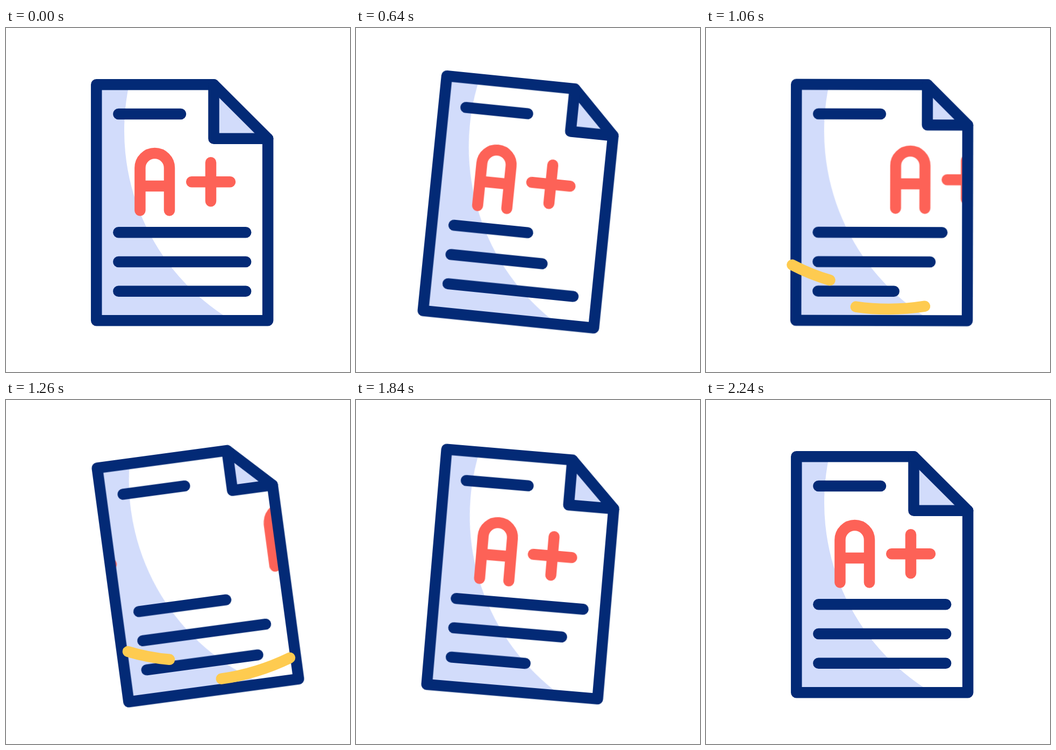
These frames come from a looping animation (640x640 px, 2.4 s). An HTML page:

```html
<!DOCTYPE html>
<html lang="en">
<head>
<meta charset="utf-8">
<title>Graded paper</title>
<style>
  html, body { margin: 0; width: 100%; height: 100%; overflow: hidden; background: #fff; }
  svg { display: block; width: 100%; height: 100%; }

  :root {
    --navy: #032a76;
    --pale: #d2dcfb;
    --red: #fd6257;
    --gold: #fecb50;
    --ease: cubic-bezier(.3333, 0, .6667, 1);
  }

  .stroke { fill: none; stroke: var(--navy); stroke-width: 20.5; stroke-linecap: round; stroke-linejoin: round; }
  .pale { fill: var(--pale); }
  .grade { stroke: var(--red); }
  .swoosh { stroke: var(--gold); }

  .page, .edge, .flap, .line, .leave, .enter { animation: 2400ms var(--ease) infinite both; }

  .page { transform-origin: 327.7px 105.2px; animation-name: swing; }
  .edge { animation-name: edge; }
  .flap { animation-name: flap; }
  .line { animation-name: write; animation-delay: calc(var(--i) * 200ms); }
  .leave { animation-name: leave; }
  .enter { animation-name: enter; }
  .swoosh { animation: sweep 2400ms linear infinite both; }

  @keyframes swing {
    0%, 8.333% { transform: rotate(0deg); }
    33.333% { transform: rotate(7deg); }
    58.333% { transform: rotate(-10deg); }
    75% { transform: rotate(5deg); }
    91.667%, 100% { transform: rotate(0deg); }
  }

  /* the folded corner shrinks, holds, then opens again */
  @keyframes edge {
    0%, 8.333%, 91.667%, 100% { d: path("M168.2 105.2 L386.5 105.2 L487.2 205.8 L487.2 544.2 L168.2 544.2 Z"); }
    33.333%, 66.667% { d: path("M168.2 105.2 L412 105.2 L487.2 180.3 L487.2 544.2 L168.2 544.2 Z"); }
  }
  @keyframes flap {
    0%, 8.333%, 91.667%, 100% { d: path("M386.5 105.2 L386.5 205.8 L487.2 205.8"); }
    33.333%, 66.667% { d: path("M412 105.2 L412 180.3 L487.2 180.3"); }
  }

  @keyframes write {
    0%, 8.333%, 41.667%, 75%, 100% { stroke-dasharray: 237 400; }
    25%, 58.333% { stroke-dasharray: 135 400; }
  }

  @keyframes leave {
    0%, 33.333% { transform: translate(0, 0); }
    58.333%, 100% { transform: translate(257.5px, -10.4px); }
  }
  @keyframes enter {
    0%, 50% { transform: translate(-254px, 0); }
    75%, 100% { transform: translate(0, 0); }
  }

  @keyframes sweep {
    0%, 33.333% { visibility: hidden; stroke-dasharray: 0 200; stroke-dashoffset: 0; }
    33.34% { visibility: visible; stroke-dasharray: 0 200; stroke-dashoffset: 0; }
    41.667% { visibility: visible; stroke-dasharray: 40 200; stroke-dashoffset: 0; }
    54.167% { visibility: visible; stroke-dasharray: 42.3 200; stroke-dashoffset: -57.7; }
    63.32% { visibility: visible; stroke-dasharray: 0 200; stroke-dashoffset: -100; }
    63.333%, 100% { visibility: hidden; stroke-dasharray: 0 200; stroke-dashoffset: -100; }
  }
</style>
</head>
<body>
<svg viewBox="0 0 640 640">
  <defs>
    <clipPath id="sheet"><path d="M168.2 105.2H487.2V544.2H168.2Z"/></clipPath>
    <path id="mark" d="M249.4 339.5V260.3a27.3 27.3 0 0 1 54.6 0V339.5M249.4 294H304M345.2 286.2H417M381 250.2V322.2"/>
  </defs>

  <g class="page">
    <path class="pale" d="M168.2 105.2H229A412 412 0 0 0 420 544.2H168.2Z"/>
    <g class="stroke grade" clip-path="url(#sheet)">
      <g class="leave"><use href="#mark"/></g>
      <g class="enter"><use href="#mark"/></g>
    </g>
    <path class="flap pale" d="M386.5 105.2L386.5 205.8L487.2 205.8"/>
    <g class="stroke">
      <path class="edge" d="M168.2 105.2L386.5 105.2L487.2 205.8L487.2 544.2L168.2 544.2Z"/>
      <path class="flap" d="M386.5 105.2L386.5 205.8L487.2 205.8"/>
      <path d="M209.3 160H325"/>
      <path class="line" style="--i:0" d="M209.3 380.3H446.2"/>
      <path class="line" style="--i:1" d="M209.3 435H446.2"/>
      <path class="line" style="--i:2" d="M209.3 489.7H446.2"/>
    </g>
  </g>

  <path class="stroke swoosh" pathLength="100" d="M141.2 430A379.2 379.2 0 0 0 318.6 483.8"/>
  <path class="stroke swoosh" pathLength="100" d="M242.1 511.7A430 430 0 0 0 550 468.2"/>
</svg>
</body>
</html>
```
